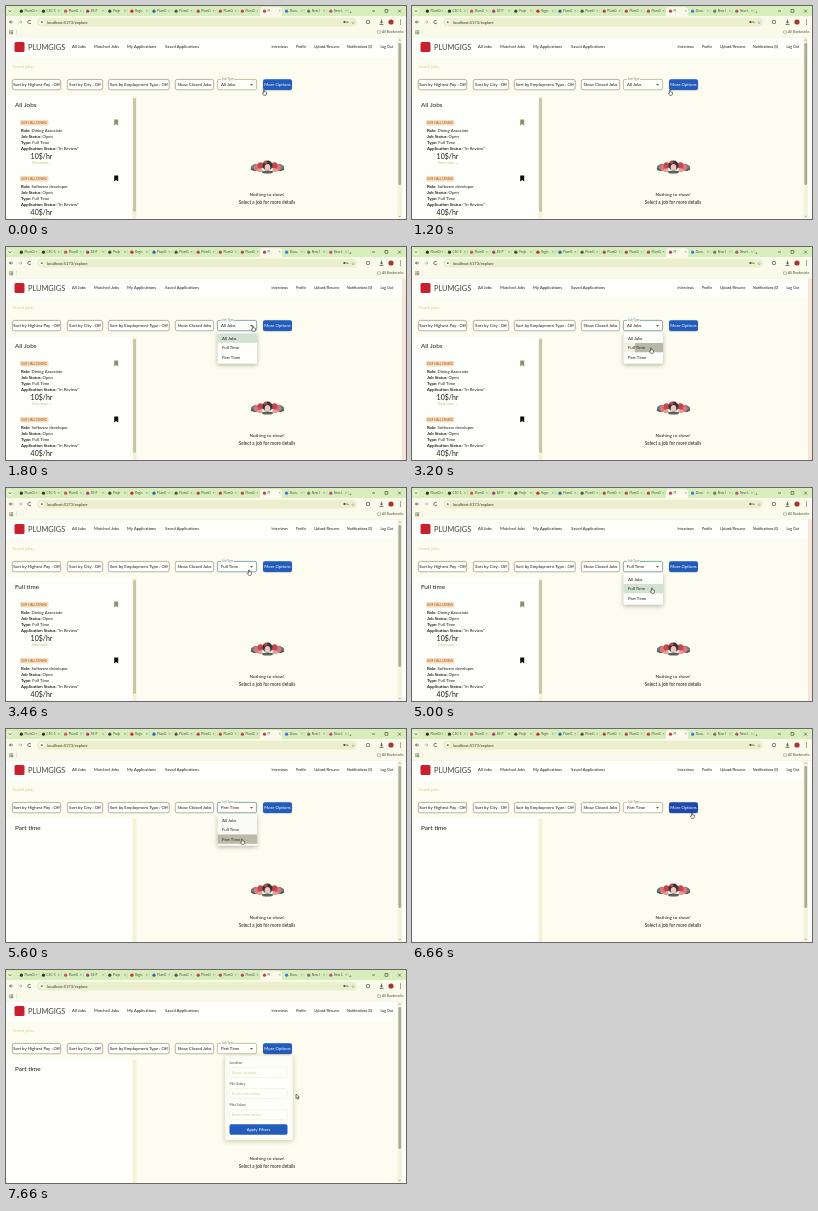
Write an HTML page with a canvas that moves like this. It is 400 by 213 pixels and loops after 8 s.

```html
<!DOCTYPE html>
<html lang="en">
<head>
<meta charset="utf-8">
<title>Job search filters</title>
<style>
html, body { margin: 0; width: 100%; height: 100%; overflow: hidden; background: #fdfdf4; }
canvas { display: block; width: 400px; height: 213px; }
</style>
</head>
<body>
<canvas id="stage"></canvas>
<script>
const LOOP = 8000, STEP = 1000 / 15;
const canvas = document.getElementById('stage');
const c = canvas.getContext('2d');
const dpr = window.devicePixelRatio || 1;
canvas.width = 400 * dpr;
canvas.height = 213 * dpr;

const INK = '#1e1e1c', PAGE = '#fefefa', PANE = '#fcfcf0';
const GOLD = '#d2d290', PALE = '#ececc4', BLUE = '#235cba', DARK_BLUE = '#1e48ac';

const clamp = v => Math.max(0, Math.min(1, v));
const span = (t, a, b) => clamp((t - a) / (b - a));
const ease = v => v * v * (3 - 2 * v);

function text(s, x, y, size, color = INK, weight = 400, align = 'left') {
  c.font = `${weight} ${size}px Lato, "Open Sans", sans-serif`;
  c.fillStyle = color;
  c.textAlign = align;
  c.textBaseline = 'middle';
  c.fillText(s, x, y);
  return c.measureText(s).width;
}

function rect(x, y, w, h, fill) {
  c.fillStyle = fill;
  c.fillRect(x, y, w, h);
}

function box(x, y, w, h, r, fill, stroke, lw = 0.6) {
  c.beginPath();
  c.roundRect(x, y, w, h, r);
  if (fill) { c.fillStyle = fill; c.fill(); }
  if (stroke) { c.strokeStyle = stroke; c.lineWidth = lw; c.stroke(); }
}

function oval(x, y, rx, ry, fill, turn = 0) {
  c.beginPath();
  c.ellipse(x, y, rx, ry, turn, 0, 7);
  c.fillStyle = fill;
  c.fill();
}

function line(points, color = INK, lw = 0.6) {
  c.beginPath();
  points.forEach(([x, y]) => c.lineTo(x, y));
  c.strokeStyle = color;
  c.lineWidth = lw;
  c.stroke();
}

function shadow(blur, dy, color, draw) {
  c.save();
  c.shadowColor = color;
  c.shadowBlur = blur * dpr;
  c.shadowOffsetY = dy * dpr;
  draw();
  c.restore();
}

const tabs = [
  ['PlumGi', '#33332f'], ['CSC-5', '#33332f'], ['PlumG', '#d0506c'], ['SE-P', '#b0387c'],
  ['Proje', '#44443f'], ['Regis', '#d02a2a'], ['PlumG', '#3060b0'], ['PlumG', '#55554f'],
  ['PlumG', '#b84450'], ['PlumG', '#b84450'], ['PlumG', '#b84450'], ['Pl', '#b84450'],
  ['Docu', '#3c78e0'], ['New I', '#777770'], ['New L', '#c05080']
];

function drawBrowser() {
  rect(0, 0, 400, 10, '#d8edbc');
  box(1, 2, 6, 6, 2, '#e6f4d0');
  line([[2.8, 4.4], [4, 5.8], [5.2, 4.4]]);
  tabs.forEach(([name, color], i) => {
    const x = 14 + i * 22.1;
    if (i === 11) box(x - 3, 1.2, 22, 10, [2.5, 2.5, 0, 0], '#fafaea');
    else line([[x + 19, 3], [x + 19, 7]], '#b4c69c', 0.4);
    oval(x + 1.4, 5.2, 1.6, 1.6, color);
    text(name, x + 4.5, 5.4, 3.2, '#4c5446');
    text('×', x + 15.6, 5.3, 3.4, '#5a624e');
  });
  text('+', 343, 5.3, 4.5, '#30382a');
  line([[366, 5], [369, 5]]);
  box(379, 3.5, 2.8, 2.8, 0, null, INK, 0.5);
  line([[392, 3.6], [395, 6.6]], INK, 0.5);
  line([[395, 3.6], [392, 6.6]], INK, 0.5);

  rect(0, 10, 400, 21.5, '#fafaea');
  box(31, 11.8, 320, 8.6, 4.3, '#ebefce');
  line([[7, 16], [3.5, 16]]);
  line([[5, 14.5], [3.5, 16], [5, 17.5]]);
  line([[12.5, 16], [16, 16]], '#a0a090');
  line([[14.5, 14.5], [16, 16], [14.5, 17.5]], '#a0a090');
  c.beginPath();
  c.arc(23.5, 16, 1.7, 0.5, 5.6);
  c.strokeStyle = INK;
  c.stroke();
  oval(35.8, 16.1, 2.6, 2.6, '#fafaea');
  oval(35.8, 16.1, 0.9, 0.9, '#55554a');
  text('localhost:5173/explore', 41, 16.3, 4, '#38382f');
  oval(338.3, 16, 1, 1, '#444438');
  line([[339, 16], [342, 16], [342, 17]], '#444438');
  text('☆', 345, 16.2, 4.5, '#444438');
  box(360.5, 14.5, 3, 3, 0.5, null, '#444438');
  line([[375.5, 13.7], [375.5, 17]]);
  line([[374, 15.6], [375.5, 17], [377, 15.6]]);
  line([[373.5, 18.4], [377.5, 18.4]]);
  oval(385, 16, 2.6, 2.6, '#a8362c');
  [14, 16, 18].forEach(y => oval(394.5, y, 0.5, 0.5, INK));

  for (let i = 0; i < 9; i++) {
    rect(3.4 + (i % 3) * 1.4, 24.4 + Math.floor(i / 3) * 1.4, 1, 1, '#66665a');
  }
  line([[10.5, 23.5], [10.5, 28.5]], '#d0d0b0', 0.4);
  box(371.5, 24.8, 3.2, 2.5, 0.4, null, '#66665a', 0.4);
  text('All Bookmarks', 376, 26.3, 3.4, '#55554a');
  rect(0, 31, 400, 0.5, '#e6e6cc');
}

function drawHeader() {
  rect(0, 31.5, 400, 182, PAGE);
  rect(0, 51, 396, 39, PANE);
  rect(130, 90, 266, 123, PANE);
  box(8.5, 36, 10, 10, 1.5, '#c8202c');
  text('PLUMGIGS', 22, 41.3, 7.4, '#44443f');
  [['All Jobs', 66], ['Matched Jobs', 88], ['My Applications', 121], ['Saved Applications', 159]]
    .forEach(([s, x]) => text(s, x, 41.2, 4.1));
  [['Interviews', 265.5], ['Profile', 290], ['Upload/Resume', 308], ['Notifications (0)', 341], ['Log Out', 374.5]]
    .forEach(([s, x]) => text(s, x, 41.2, 3.6));
  text('Search jobs..', 6.5, 60.3, 4, GOLD);
}

function drawFilters(choice, active, hover) {
  [['Sort by Highest Pay : Off', 6, 49], ['Sort by City : Off', 61, 36],
   ['Sort by Employment Type : Off', 102, 61.5], ['Show Closed Jobs', 169, 39]]
    .forEach(([s, x, w]) => {
      box(x + 0.3, 73.4, w - 0.6, 10.4, 2, PAGE, '#84846c', 0.6);
      text(s, x + w / 2, 78.8, 4.3, INK, 400, 'center');
    });
  box(211.4, 73.4, 39.2, 10.4, 1.5, PAGE, active ? '#6f94a4' : '#9a9a70', active ? 0.8 : 0.6);
  rect(215, 72.4, 13, 2, PANE);
  text('Job Type', 216, 73.3, 3, active ? '#6f94a4' : '#8a8a70');
  text(choice, 215, 79, 4.3);
  c.beginPath();
  c.moveTo(244, 78);
  c.lineTo(247, 78);
  c.lineTo(245.5, 79.8);
  c.fillStyle = '#5a5a50';
  c.fill();
  shadow(1.2, 0.5, 'rgba(60,60,40,.35)', () => box(257, 73.2, 29, 10.8, 2, hover ? DARK_BLUE : BLUE));
  text('More Options', 271.5, 78.8, 4.3, '#fff', 400, 'center');
}

function drawCard(y, org, role, pay, saved) {
  box(14, y + 7, 28.5, 5.4, 1, '#f8dfbc');
  text(org, 28.2, y + 9.8, 3, '#a04c2c', 400, 'center');
  const x = 108.2, top = y + 6.6;
  c.beginPath();
  [[0, 0], [4, 0], [4, 6], [2, 4.3], [0, 6]].forEach(([dx, dy]) => c.lineTo(x + dx, top + dy));
  c.closePath();
  c.fillStyle = saved ? '#0d0d0b' : '#8f8f6c';
  c.fill();
  [['Role: ', role], ['Job Status: ', 'Open'], ['Type: ', 'Full Time'], ['Application Status: ', '"In Review"']]
    .forEach(([label, value], i) => {
      const ly = y + 17.8 + i * 6.1;
      const w = text(label, 15, ly, 4.25, INK, 700);
      text(value, 15 + w, ly, 4.25);
    });
  text(pay, 35.5, y + 44, 7, INK, 400, 'center');
  text('View more ⌄', 36, y + 50.3, 3.5, '#c2c27c', 400, 'center');
}

function drawJobs(title, listed) {
  text(title, 9, 98.7, 6.4);
  if (listed) {
    drawCard(107, 'ELM HALL DINING', 'Dining Associate', '10$/hr', false);
    drawCard(163, 'ELM HALL DINING', 'Software developer', '40$/hr', true);
  }
  rect(126.5, 90, 4, 123, '#f3f3d8');
  if (listed) box(127, 92, 3, 114, 1.4, '#c6c6a8');
}

function drawEmpty() {
  for (const side of [-1, 1]) {
    const x = d => 261.5 + side * d;
    oval(x(13.5), 160, 3.4, 1.5, '#6c7484', side * 0.5);
    oval(x(14), 163.5, 3, 1.3, '#4f5a58', side * -0.3);
    oval(x(10.5), 161.5, 3.2, 3.4, '#d9777c');
    oval(x(7), 159.5, 3, 3.2, '#c4484f');
    oval(x(7.5), 164.5, 2.8, 1.8, '#e0a0a0');
  }
  oval(261.5, 159.5, 5, 5, '#3a3036');
  oval(261.5, 161.4, 2.8, 3.5, '#ecc8bc');
  oval(259.5, 156.2, 1.9, 1.5, '#c4484f');
  oval(261.5, 166, 5.5, 1.5, '#59615c');
  text('Nothing to show!', 261, 189, 4.6, INK, 400, 'center');
  text('Select a job for more details', 261, 196.5, 4.65, INK, 400, 'center');
}

function drawEdge(locked) {
  if (locked) {
    rect(396, 31.5, 4, 182, '#f8e4d6');
    return;
  }
  rect(391.5, 31.5, 4.5, 182, '#f4f4dc');
  box(392.4, 37, 2.7, 142, 1.3, '#aaaa96');
  line([[392.8, 34.8], [393.7, 33.6], [394.6, 34.8]], '#77776a', 0.5);
  line([[392.8, 209.8], [393.7, 211], [394.6, 209.8]], '#77776a', 0.5);
}

// The page cannot scroll while a menu is open; the choice applies at close.
const menus = [
  { open: 1660, close: 3260, selected: 0, row: 1, hover: 3060, press: 3110, x: 239, y: 101 },
  { open: 4330, close: 5590, selected: 1, row: 2, hover: 5320, press: 5440, x: 236, y: 110 }
];

function drawMenu(t, m) {
  const shown = span(t, m.open, m.open + 140);
  const alpha = shown * (1 - span(t, m.close, m.close + 200));
  if (!alpha) return;
  c.save();
  c.globalAlpha = alpha;
  c.translate(231, 85);
  c.scale(0.8 + 0.2 * ease(shown), 0.6 + 0.4 * ease(shown));
  c.translate(-231, -85);
  shadow(4, 1.5, 'rgba(80,80,50,.4)', () => box(211.5, 84.8, 39.5, 32, 1.2, PAGE));
  const top = row => 86.4 + row * 9.5;
  const hovered = t >= m.hover;
  if (!hovered) rect(211.5, top(m.selected), 39.5, 9.4, '#d2e2d2');
  if (hovered) {
    rect(211.5, top(m.row), 39.5, 9.4, '#f0f0e0');
    c.save();
    c.beginPath();
    c.rect(211.5, top(m.row), 39.5, 9.4);
    c.clip();
    const r = 2 + (t - m.press) * 0.16;
    if (t >= m.press) oval(m.x, m.y, r, r, '#b8b8a8');
    c.restore();
  }
  ['All Jobs', 'Full Time', 'Part Time'].forEach((s, i) => text(s, 216, top(i) + 4.8, 4.3));
  c.restore();
}

function drawPanel() {
  shadow(4, 1, 'rgba(120,120,60,.35)', () => box(219, 85.5, 68, 84.5, 2, PAGE, PALE, 0.4));
  [['Location', 'Enter location'], ['Min Salary', 'Enter min salary'], ['Max Salary', 'Enter max salary']]
    .forEach(([label, hint], i) => {
      const y = 93.2 + i * 21.1;
      text(label, 223.5, y, 3.4, '#55554a');
      box(223.5, y + 4.3, 58, 10, 1.2, PAGE, PALE, 0.5);
      text(hint, 226, y + 9.4, 4, GOLD);
    });
  box(223.5, 154.3, 58, 10.4, 1.6, BLUE);
  text('Apply Filters', 252.5, 159.6, 4.3, '#fff', 400, 'center');
}

// Cursor moves: start, end, destination.
const moves = [
  [1540, 1670, 247, 79], [2940, 3130, 239, 101], [3260, 3460, 243, 82],
  [4460, 4860, 240, 100], [5200, 5400, 236, 110], [6000, 6260, 250, 99],
  [6340, 6660, 280, 84], [7400, 7660, 290, 124]
];

function cursorAt(t) {
  let x = 258, y = 84;
  for (const [a, b, tx, ty] of moves) {
    const k = ease(span(t, a, b));
    x += (tx - x) * k;
    y += (ty - y) * k;
  }
  return [x, y];
}

function drawCursor(x, y, arrow) {
  c.save();
  c.translate(x, y);
  const shape = arrow
    ? [[0, 0], [0, 4.6], [1.1, 3.7], [1.9, 5.3], [2.6, 5], [1.9, 3.4], [3.3, 3.3]]
    : [[-0.5, 0], [0.4, 0], [0.5, 1.8], [2.5, 2.2], [2.5, 4], [1.9, 5.3], [-0.4, 5.3], [-1.7, 3.2], [-1.2, 2.7], [-0.5, 3.2]];
  c.beginPath();
  shape.forEach(([px, py]) => c.lineTo(px, py));
  c.closePath();
  c.fillStyle = '#fff';
  c.fill();
  c.strokeStyle = '#22221c';
  c.lineWidth = 0.55;
  c.stroke();
  c.restore();
}

function draw(t) {
  const picked = menus.filter(m => t >= m.close).length;
  const locked = menus.some(m => t >= m.open && t < m.close);
  const [x, y] = cursorAt(t);
  const panelOpen = t >= 7460;
  const onButton = t > 6400 && x > 257 && x < 286 && y < 88;
  c.setTransform(dpr, 0, 0, dpr, 0, 0);
  drawBrowser();
  drawHeader();
  drawFilters(['All Jobs', 'Full Time', 'Part Time'][picked], t >= menus[0].open && t < 6500, onButton);
  drawJobs(['All Jobs', 'Full time', 'Part time'][picked], picked < 2);
  drawEmpty();
  drawEdge(locked);
  menus.forEach(m => drawMenu(t, m));
  if (panelOpen) drawPanel();
  drawCursor(x, y, panelOpen && !onButton);
}

const start = performance.now();
function tick() {
  const t = (performance.now() - start) % LOOP;
  draw(Math.floor((t + 7) / STEP) * STEP % LOOP);
  requestAnimationFrame(tick);
}
tick();
</script>
</body>
</html>
```
